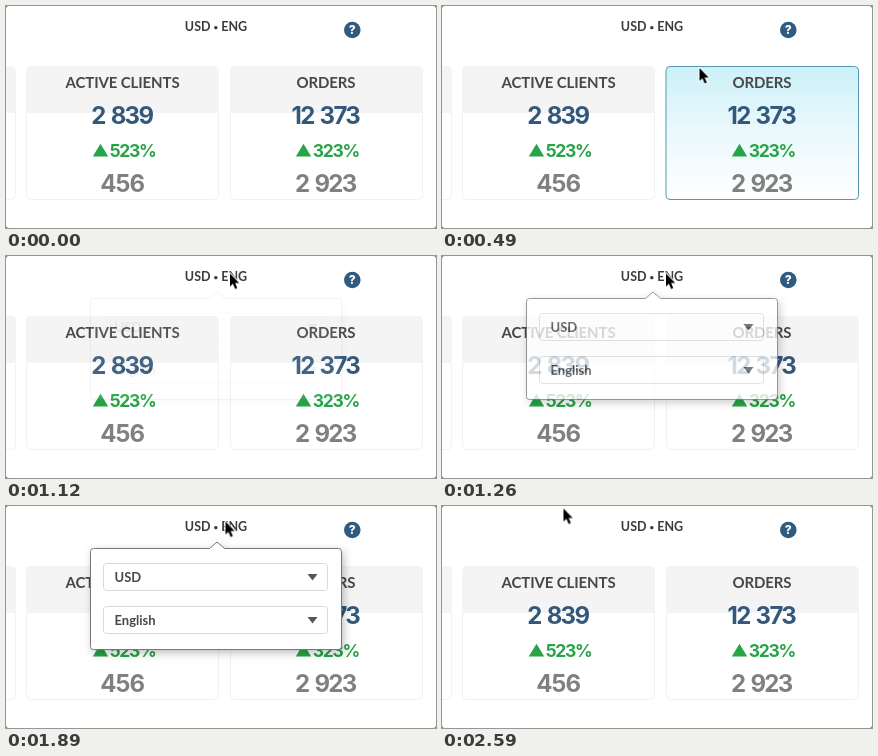
An HTML page for the animation above (2.66 s loop, 430x222 px).

```html
<!DOCTYPE html>
<html lang="en">
<head>
<meta charset="utf-8">
<title>Dashboard currency menu</title>
<style>
  html, body { margin: 0; width: 100%; height: 100%; overflow: hidden; background: #777; }
  svg { display: block; width: 430px; height: 222px; }
  text { font: 700 13px Lato, "Open Sans", sans-serif; fill: #484848; }
  .mid { text-anchor: middle; }
  .lang { font-size: 12.5px; fill: #3c3c3c; }
  .dot { font-size: 8px; }
  .help { font: 800 12px Inter, sans-serif; fill: #fff; }
  .title { font-size: 15px; letter-spacing: -.12px; }
  .num, .old { font: 700 24px Inter, sans-serif; letter-spacing: -1.7px; word-spacing: 2px; }
  .num { fill: #33587c; }
  .old { fill: #808080; }
  .tight { letter-spacing: -.9px; }
  .up { font: 700 17.5px Inter, sans-serif; letter-spacing: -1.3px; }
  .up, .tri { fill: #27a348; }
  .card { fill: #fff; stroke: #f1f1f1; }
  .head { fill: #f4f4f4; }
  .box { fill: #fff; stroke: #d9d9d9; }
  .caret { fill: #555; }

  .hot, .menu, .cursor, .arrow, .hand, .lang {
    animation: 2660ms step-end infinite;
  }
  .hot { animation-name: hot; }
  .lang { animation-name: lang; }
  .menu { animation-name: menu; filter: drop-shadow(2px 3px 4px rgba(0, 0, 0, .25)); }
  .cursor { animation-name: move; }
  .arrow { animation-name: arrow; stroke: #fff; stroke-width: 2; paint-order: stroke; stroke-linejoin: round; }
  .hand { animation-name: hand; fill: #fff; stroke: #111; stroke-linejoin: round; }

  @keyframes hot {
    0%, 21.052% { opacity: 0; }
    2.631% { opacity: 1; }
    100% { opacity: 0; }
  }
  @keyframes lang {
    0%, 42.105% { fill: #3c3c3c; }
    21.052% { fill: #2f5b80; }
    100% { fill: #3c3c3c; }
  }
  @keyframes menu {
    0% { opacity: 0; }
    42.105% { opacity: .08; }
    44.736% { opacity: .45; }
    47.368% { opacity: .78; }
    50% { opacity: .94; }
    52.631% { opacity: 1; }
    86.842% { opacity: .99; }
    89.473% { opacity: .97; }
    92.105% { opacity: .6; }
    94.736% { opacity: .2; }
    97.368%, 100% { opacity: 0; }
  }
  @keyframes move {
    0% { transform: translate(300px, 134px); }
    2.631% { transform: translate(300px, 134px); animation-timing-function: steps(6); }
    18.421% { transform: translate(257.5px, 62px); }
    21.052% { transform: translate(234px, 20px); animation-timing-function: steps(3); }
    28.947% { transform: translate(228px, 16px); animation-timing-function: steps(5); }
    42.105% { transform: translate(224px, 17.5px); }
    71.052% { transform: translate(219.5px, 15.5px); }
    73.684% { transform: translate(203px, 12px); }
    76.315% { transform: translate(172px, 8px); }
    78.947% { transform: translate(138px, 4px); }
    81.578%, 100% { transform: translate(121.5px, 2.5px); }
  }
  @keyframes arrow {
    0%, 21.052% { opacity: 0; }
    2.631%, 42.105%, 100% { opacity: 1; }
  }
  @keyframes hand {
    0%, 42.105%, 100% { opacity: 0; }
    21.052% { opacity: 1; }
  }
</style>
</head>
<body>
<svg viewBox="0 0 430 222">
  <defs>
    <linearGradient id="sky" x2="0" y2="1">
      <stop stop-color="#ccf0f8"/>
      <stop offset=".45" stop-color="#e8f8fc"/>
      <stop offset="1" stop-color="#fff"/>
    </linearGradient>
  </defs>

  <rect width="430" height="222" rx="3" fill="#fff"/>
  <text class="lang mid" x="210" y="25.3">USD <tspan class="dot" dy="-1">•</tspan><tspan dy="1"> ENG</tspan></text>
  <circle cx="346.3" cy="24" r="8.3" fill="#2f5b80"/>
  <text class="help mid" x="346.3" y="28.4">?</text>

  <rect class="card" x="-20" y="60.5" width="29.5" height="133" rx="5"/>
  <path class="head" d="M0 60H5Q10 60 10 65V107H0Z"/>
  <rect class="card" x="20.5" y="60.5" width="192" height="133" rx="5"/>
  <path class="head" d="M20 107V65Q20 60 25 60H208Q213 60 213 65V107Z"/>
  <rect class="card" x="224.5" y="60.5" width="192" height="133" rx="5"/>
  <path class="head" d="M224 107V65Q224 60 229 60H412Q417 60 417 65V107Z"/>
  <rect class="hot" x="224" y="60.5" width="192.5" height="133" rx="4" fill="url(#sky)" stroke="#5797b5"/>

  <text class="title mid" x="116.5" y="82">ACTIVE CLIENTS</text>
  <text class="num mid" x="115.8" y="118">2 839</text>
  <path class="tri" d="M86.8 150.5L94.5 137.7L102.2 150.5Z"/>
  <text class="up" x="103.7" y="150.5">523%</text>
  <text class="old tight mid" x="116.2" y="186">456</text>

  <text class="title mid" x="320" y="82">ORDERS</text>
  <text class="num mid" x="319.3" y="118">12 373</text>
  <path class="tri" d="M289.8 150.5L297.5 137.7L305.2 150.5Z"/>
  <text class="up" x="306.7" y="150.5">323%</text>
  <text class="old mid" x="319.3" y="186">2 923</text>

  <g class="menu">
    <path fill="#fff" stroke="#777" d="M87.5 42.5H203.5L211 36L218.5 42.5H332.5Q335.5 42.5 335.5 45.5V140.5Q335.5 143.5 332.5 143.5H87.5Q84.5 143.5 84.5 140.5V45.5Q84.5 42.5 87.5 42.5Z"/>
    <rect class="box" x="97.5" y="57.5" width="224" height="27" rx="3"/>
    <text x="108.5" y="75.5">USD</text>
    <path class="caret" d="M301.5 68H311.5L306.5 74.5Z"/>
    <rect class="box" x="97.5" y="100.5" width="224" height="27" rx="3"/>
    <text x="108.5" y="118.5">English</text>
    <path class="caret" d="M301.5 111H311.5L306.5 117.5Z"/>
  </g>

  <g class="cursor">
    <path class="arrow" d="M0 0V13L2.9 10.2L5.2 15.4L7.3 14.5L5.1 9.4H9.2Z"/>
    <path class="hand" d="M-1.8 1.5C-1.8-.6 1.2-.8 1.7 1.2L2.6 5C4 4 5.2 4.4 5.6 5.4C6.8 4.6 8 5 8.4 6C9.6 5.4 10.8 6 10.8 7.4C11 10 10.5 11.5 9.6 13V15.5H1.5C.5 13-2 11-4.2 9C-5.5 7.6-3.8 6-2.2 7L-.6 8.2ZM3 9v4M5.3 9v4M7.6 9v4"/>
  </g>
</svg>
</body>
</html>
```
